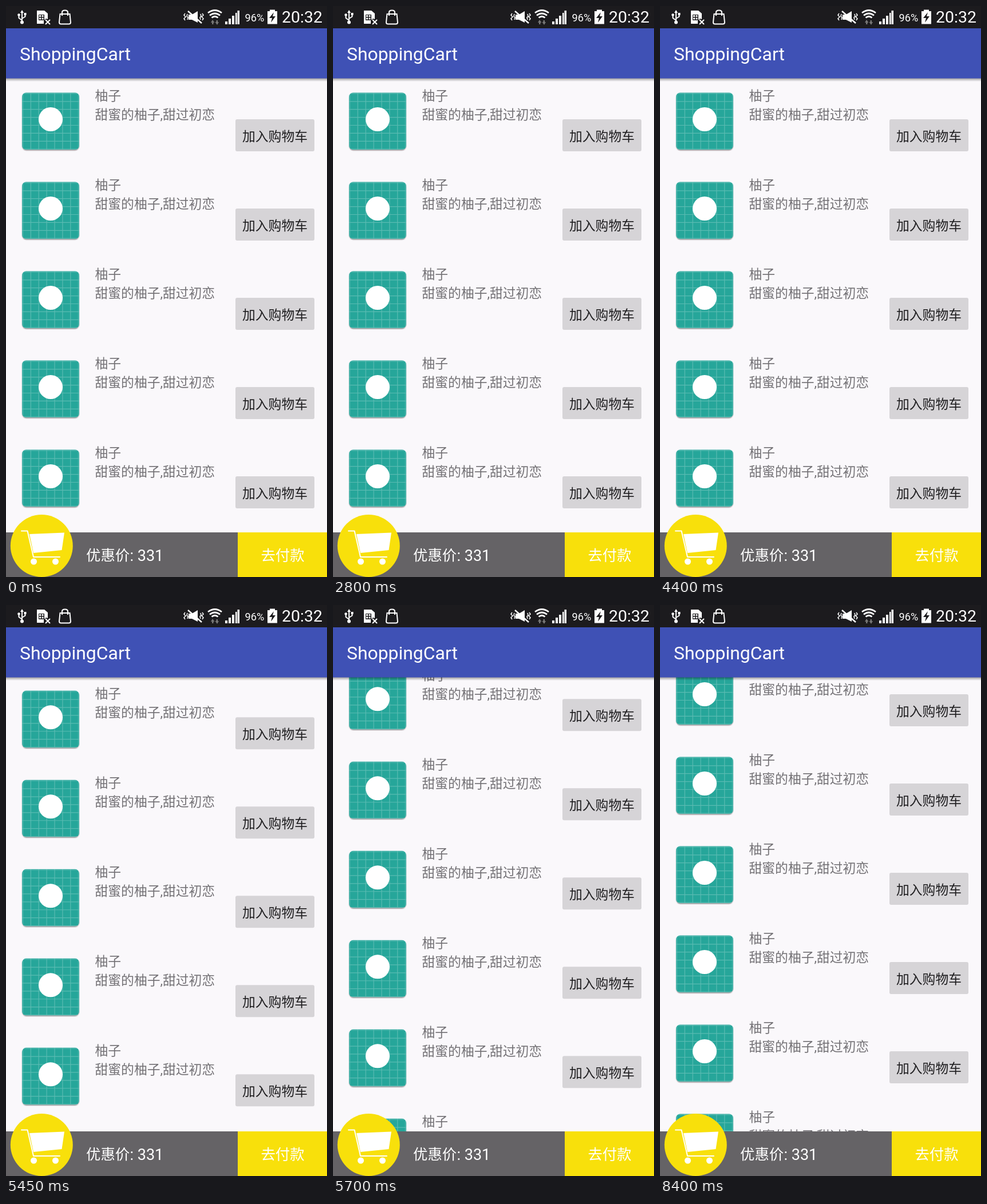
An HTML page for the animation above (8600 ms loop, 561 by 998 pixels).

```html
<!DOCTYPE html>
<html lang="zh-CN">
<head>
<meta charset="utf-8">
<title>ShoppingCart</title>
<style>
  html, body { margin: 0; width: 100%; height: 100%; overflow: hidden; background: #faf8fb; }
  svg { display: block; width: 561px; height: 998px; }
  text { font-family: Roboto, "Noto Sans CJK SC", "Noto Sans CJK", sans-serif; white-space: pre; }
  .info { font-size: 22.8px; fill: #747276; }
  .label { font-size: 22.8px; fill: #1f1e20; text-anchor: middle; }
  .button { fill: #d6d4d7; }
  .pressed { fill: #b9b8ba; }
  .white { fill: #fff; }
  .line { fill: none; stroke: #fff; stroke-width: 2; }
</style>
</head>
<body>
<svg viewBox="0 0 561 998">
  <defs>
    <clipPath id="listArea"><rect y="126" width="561" height="794"/></clipPath>
    <linearGradient id="shade" x2="0" y2="1">
      <stop stop-color="#000" stop-opacity=".38"/>
      <stop offset="1" stop-color="#000" stop-opacity="0"/>
    </linearGradient>
    <g id="tile">
      <rect x="27.5" y="152.5" width="101" height="101" rx="8" fill="#000" opacity=".12"/>
      <rect x="28" y="152" width="100" height="100.5" rx="8" fill="#000" opacity=".25"/>
      <rect x="28" y="151.5" width="100" height="99.5" rx="7" fill="#26a69a"/>
      <path id="grid" fill="none" stroke="#fff" stroke-opacity=".24" stroke-width="1.2"/>
      <circle cx="78" cy="198" r="21" fill="#fff"/>
    </g>
  </defs>

  <rect width="561" height="998" fill="#faf8fb"/>
  <g clip-path="url(#listArea)"><g id="list"></g></g>

  <!-- app bar -->
  <rect y="126" width="561" height="6" fill="url(#shade)"/>
  <rect y="39" width="561" height="87.5" fill="#3f51b5"/>
  <text class="white" x="24" y="95" font-size="31.9">ShoppingCart</text>

  <!-- status bar -->
  <rect width="561" height="39" fill="#1c1b1e"/>
  <g class="line">
    <path d="M28 10V29M28 25L22.500 21V16M28 22L33.500 18.500V14"/>
    <path d="M94.500 14H111.500L113 28.500Q113 31.500 110 31.500H96Q93 31.500 93 28.500ZM98 17V11Q98 7.500 103 7.500T108 11V17"/>
    <path d="M69 24L77 32M77 24L69 32"/>
    <path d="M313 13l-2 3 3 3-3 3 2 3M343 13l2 3-3 3 3 3-2 3M317 14l-1 4 2 2-1 4M340 14l1 4-2 2 1 4" stroke-width="1.5"/>
    <path d="M318 9L342 30" stroke-width="2.400"/>
    <path d="M353 12Q365 3 377 12M356 16.500Q365 9.500 374 16.500M359.500 20.500Q365 16 370.500 20.500" stroke-width="2.800"/>
  </g>
  <g class="white">
    <path d="M25 12L28 7L31 12Z"/>
    <circle cx="28" cy="28.500" r="3"/>
    <circle cx="22.500" cy="15.500" r="2.300"/>
    <rect x="31.500" y="12" width="4" height="4"/>
    <path fill-rule="evenodd" d="M54 8H67L73 13V23L70 22L66 25V31H54ZM57 15V25H67V15Z"/>
    <path d="M58 16h3v3h-3zM62.500 16h3v3h-3zM58 20.500h3v3h-3zM62.500 20.500h3v3h-3z"/>
    <path d="M319 15H325L335 9V29L325 24H319Z"/>
    <path d="M383 27h4v5h-4zM389 22h4v10h-4zM395 17h4v15h-4zM401 12h2.500v20h-2.500zM404.500 8h3.500v24h-3.500z"/>
    <path d="M457 9H461V6.500H470V9H474V31.500H457Z"/>
  </g>
  <path d="M361 24l3.500 5h-2v3h-2.500v-3h-2zM369 33l-3.500-5h2v-3h2.500v3h2z" fill="#777"/>
  <path d="M468 11L460 21H465L463 29L471 18H466Z" fill="#1c1b1e"/>
  <text class="white" x="417.500" y="26.500" font-size="18.300">96%</text>
  <text class="white" x="482" y="29" font-size="28.500">20:32</text>

  <!-- checkout bar -->
  <rect y="920" width="405" height="78" fill="#656366"/>
  <rect x="405" y="920" width="156" height="78" fill="#f8e00b"/>
  <text class="white" x="140" y="969" font-size="25.400">优惠价</text>
  <text class="white" x="216.500" y="969.500" font-size="27">: 331</text>
  <text class="white" x="483.500" y="969" font-size="25.400" text-anchor="middle">去付款</text>

  <!-- cart -->
  <circle cx="62.300" cy="943.500" r="54.500" fill="#f8e00b"/>
  <path class="line" d="M27 917.500H37.500L48 963H94" stroke-width="4" stroke-linecap="round" stroke-linejoin="round"/>
  <path class="white" d="M41 923L102 920.500L97.500 951L48 956Z"/>
  <circle class="white" cx="48.500" cy="971" r="5.500"/>
  <circle class="white" cx="86.500" cy="971" r="5.500"/>

  <circle id="dot" r="12" fill="#f8e00b" visibility="hidden"/>
</svg>

<script>
  const LOOP = 8600, STEP = 50, ROW = 156, TAPPED = 1;
  const $ = id => document.getElementById(id);
  const list = $('list'), dot = $('dot');

  let grid = '';
  for (let i = 0; i < 8; i++) {
    const d = 1.4 + i * 13.9;
    grid += `M${28 + d} 151.5v99.5M28 ${151.5 + d}h100`;
  }
  $('grid').setAttribute('d', grid);

  for (let i = 0; i < 6; i++) {
    list.innerHTML += `<g transform="translate(0 ${i * ROW})">
      <use href="#tile"/>
      <text class="info" x="155.500" y="165">柚子</text>
      <text class="info" x="155.500" y="197.500">甜蜜的柚子,甜过初恋</text>
      <rect class="button" x="401" y="198" width="138" height="56" rx="3"/>
      <text class="label" x="470" y="235.500">加入购物车</text>
    </g>`;
  }
  const button = list.querySelectorAll('.button')[TAPPED];

  // press time and landing time of each tap
  const taps = [[1850, 2150], [2900, 3200], [3500, 3800], [4050, 4400],
                [4700, 5050], [6800, 7150], [7450, 7800]];

  function scrollAt(t) {
    if (t >= 5800) return 42;
    const p = Math.max(0, (t - 5400) / 420);
    return 42 * p * p * (3 - 2 * p);
  }

  function render(t) {
    const scroll = scrollAt(t);
    list.setAttribute('transform', `translate(0 ${-scroll})`);

    const tap = taps.find(([start, end]) => t >= start && t < end);
    button.classList.toggle('pressed', !!tap && t - tap[0] < 100);

    const p = tap ? (t - tap[0]) / (tap[1] - tap[0]) : 0;
    const y0 = 226 + TAPPED * ROW - scroll;
    dot.setAttribute('visibility', p > 0 ? 'visible' : 'hidden');
    dot.setAttribute('cx', 470 - 408 * p);
    dot.setAttribute('cy', y0 + (943 - y0) * p * p);
  }

  const origin = performance.now();
  function tick() {
    const t = (performance.now() - origin) % LOOP;
    render(Math.floor(t / STEP) * STEP);
    requestAnimationFrame(tick);
  }
  tick();
</script>
</body>
</html>
```
